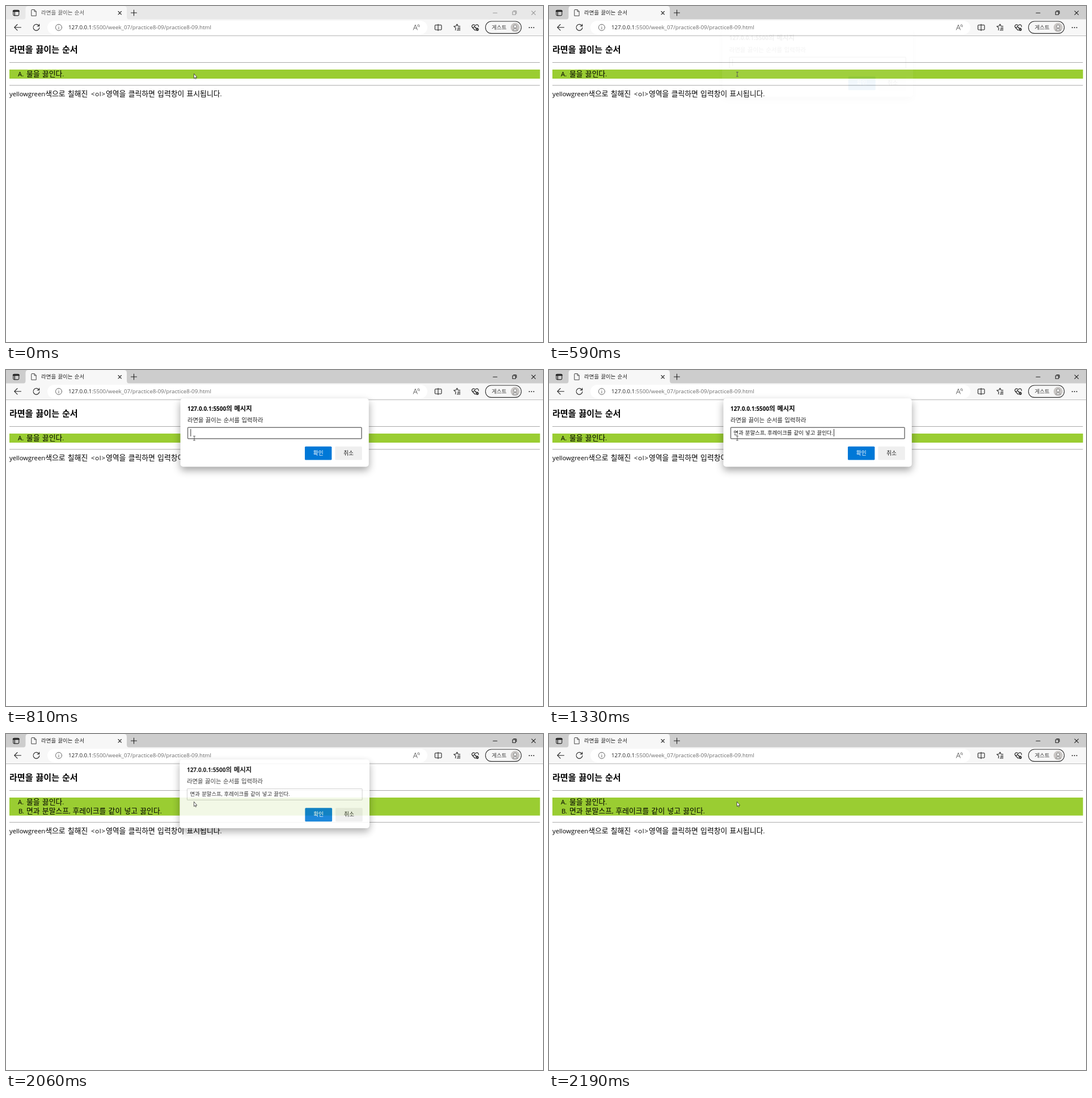
These frames come from a looping animation (947 by 592 pixels, 3400 ms). An HTML page:

```html
<!DOCTYPE html>
<html lang="ko">
<head>
<meta charset="utf-8">
<title>라면을 끓이는 순서</title>
<style>
html, body { margin: 0; width: 100%; height: 100%; overflow: hidden; background: #fff; }
svg { display: block; width: 947px; height: 592px; }
text { white-space: pre; word-spacing: .04em; font-family: "Open Sans", "Noto Sans", sans-serif; }
.ko { font-family: "Noto Sans CJK KR", "Noto Sans CJK", sans-serif; }
.icon { fill: none; stroke: #222; stroke-width: 1.1; stroke-linecap: round; stroke-linejoin: round; }
#box { filter: drop-shadow(0 6px 7px rgba(0, 0, 0, .36)); }
</style>
</head>
<body>
<svg viewBox="0 0 947 592">
  <rect width="947" height="592" fill="#fff"/>

  <!-- title bar -->
  <rect id="titlebar" width="947" height="24"/>
  <path d="M30 24Q34.5 24 34.5 19V5Q34.5 0 39.5 0H208Q213 0 213 5V19Q213 24 218 24Z" fill="#f7f7f7"/>
  <g class="icon">
    <rect x="12.8" y="7.3" width="10" height="9.6" rx="1.8"/>
    <path d="M13 9H22.6" stroke-width="2.6"/><path d="M15.4 9V16.5" stroke-width="1.2"/>
    <path d="M45.8 6.5H50.2L53.2 9.5V17.3H44.8V7.5Q44.8 6.5 45.8 6.5ZM50 6.8V9.8H53" stroke="#444" stroke-width="1"/>
    <path d="M198 9.5L203.4 14.9M203.4 9.5L198 14.9"/>
    <path d="M220.5 12H230.5M225.5 7V17"/>
  </g>
  <g id="controls" class="icon" stroke-width="1">
    <path d="M859 12.2H866M927 8.8L933.6 15.4M933.6 8.8L927 15.4"/>
    <path d="M893.3 10H898.6V15.2H893.3ZM895 8.5H899Q900.1 8.5 900.1 9.6V13.5"/>
  </g>

  <!-- toolbar -->
  <rect y="23.5" width="947" height="29" fill="#f7f7f7"/>
  <path d="M0 52.5H947" stroke="#bcbcbc"/>
  <rect x="73" y="26" width="670" height="24" rx="12" fill="#fff"/>
  <g class="icon">
    <path d="M26.5 37.7H14.8M20 32.5L14.8 37.7L20 42.9"/>
    <path d="M58.3 35.2A5.4 5.4 0 1 0 58.9 38M58.7 32V35.5H55.2"/>
    <g stroke="#666" stroke-width="1">
      <circle cx="93" cy="37.8" r="5.5"/><path d="M93 37.4V40.6M93 35.2V35.3"/>
      <path d="M718.3 42L721.8 33L725.3 42M719.6 39H724M725.6 33.4Q727 34.5 726.6 36.2M727.4 32.2Q729.8 34 729 36.8"/>
    </g>
    <path d="M761 33.5H757.7Q756.5 33.5 756.5 34.7V40.8Q756.5 42 757.7 42H761M763 33.5H766.8Q768 33.5 768 34.7V40.8Q768 42 766.8 42H763M762 32V43.5"/>
    <path d="M792.5 42.5L793.2 38.8L789.8 35.8L793.7 35.3L795.4 32L797 35.3L800.8 35.8M797 38H800.8M796.4 40.4H800.8M795.4 42.8H800.8"/>
    <path d="M827.5 43L822.5 38Q820.5 35.5 822.5 33.6Q825 31.7 827.5 34.5Q830 31.7 832.5 33.6Q833.8 35 833.2 36.6M822.5 37.7H825L826.3 35.4L828 39L829 37.5"/>
    <circle cx="831" cy="41.2" r="2.6" fill="#222" stroke="none"/>
    <path d="M829.8 41.2L830.7 42.1L832.3 40.4" stroke="#fff" stroke-width=".7"/>
    <rect x="845.5" y="27" width="63.2" height="21.4" rx="10.7" stroke="#333"/>
  </g>
  <circle cx="897.8" cy="37.8" r="8" fill="#c9c6c4"/>
  <g fill="#f4f4f4" stroke="#777" stroke-width=".9">
    <path d="M893.8 43.2Q893.8 40 897.8 40Q901.8 40 901.8 43.2Z"/><circle cx="897.8" cy="36" r="2.7"/>
  </g>
  <g fill="#222"><circle cx="922.8" cy="38" r="1"/><circle cx="926.7" cy="38" r="1"/><circle cx="930.6" cy="38" r="1"/></g>
  <g id="labels"></g>

  <!-- page -->
  <path d="M6 99.5H941.5" stroke="#a9a9a9"/>
  <rect id="list" x="6" y="112" width="935.7" fill="#9acd32"/>
  <g id="page"></g>
  <g id="second"></g>
  <g id="after"><path d="M6 139.8H941.5" stroke="#a9a9a9"/></g>

  <!-- prompt -->
  <g id="dialog">
    <rect id="box" x="307.5" y="50" width="332.3" height="120.5" rx="5" fill="#fff"/>
    <rect id="input" x="320.5" y="101.3" width="306.6" height="19.6" rx="1" fill="#fff"/>
    <rect x="527" y="134.8" width="47.4" height="23.8" rx="1.5" fill="#0078d7"/>
    <rect x="580.4" y="134.8" width="47.4" height="23.8" rx="1.5" fill="#efefef"/>
    <g id="entry"></g>
    <rect id="caret" y="104" width="1" height="13" fill="#333"/>
  </g>

  <path id="arrow" d="M331.4 119.2V127.6L333.2 126L334.4 128.6L335.6 128L334.5 125.5H336.8Z" fill="#fff" stroke="#333" stroke-width=".8"/>
  <path id="beam" d="M330 116.5H334M332 116.5V124M330 124H334" fill="none" stroke="#555" stroke-width=".9"/>
</svg>

<script>
const LOOP = 3400;
const $ = id => document.getElementById(id);

function add(parent, name, attrs) {
  const node = document.createElementNS("http://www.w3.org/2000/svg", name);
  for (const key in attrs) node.setAttribute(key, attrs[key]);
  return parent.appendChild(node);
}

// Korean and Latin runs each get their own face and optical size.
function write(parent, x, y, string, size, attrs = {}) {
  const line = add($(parent), "text", { x, y, ...attrs });
  for (const run of string.match(/[가-힣][가-힣 ]*|[^가-힣]+/g)) {
    const korean = /[가-힣]/.test(run);
    const span = add(line, "tspan", {
      class: korean ? "ko" : "latin",
      "font-size": size * (korean ? 1.07 : .94)
    });
    span.textContent = run;
  }
  return line;
}

const STEP = "면과 분말스프, 후레이크를 같이 넣고 끓인다.";
const bold = { "font-weight": 700 };
const middle = { "text-anchor": "middle" };

const tabTitle = write("labels", 62, 14.8, "라면을 끓이는 순서", 8.85);
write("labels", 110, 41.3, "127.0.0.1", 10.44, { fill: "#222" });
write("labels", 151.2, 41.3, ":5500/week_07/practice8-09/practice8-09.html", 10.44, { fill: "#6b6b6b" });
write("labels", 869.6, 40.9, "게스트", 8.9, { ...middle, fill: "#333" });

write("page", 6, 81.6, "라면을 끓이는 순서", 14.1, bold);
write("page", 21, 124.4, "A.", 12);
write("page", 36, 124.4, "물을 끓인다.", 12);
write("second", 22, 140.2, "B.", 12);
write("second", 36, 140.2, STEP, 12);
write("after", 6, 159.2, "yellowgreen색으로 칠해진", 12);
write("after", 150, 159.2, "<ol>", 12, { "letter-spacing": .8 });
write("after", 176, 159.2, "영역을 클릭하면 입력창이 표시됩니다.", 12);

write("dialog", 320, 72, "127.0.0.1:5500의 메시지", 10.6, bold);
write("dialog", 320, 92.3, "라면을 끓이는 순서를 입력하라", 9.6, { fill: "#222" });
write("dialog", 550.7, 149.7, "확인", 9.1, { ...middle, fill: "#fff" });
write("dialog", 604.1, 149.7, "취소", 9.1, { ...middle, fill: "#222" });
write("entry", 325.6, 114.2, STEP, 8.75, { fill: "#111" });

// Prompt poses: start time, opacity, vertical shift, scale.
const poses = [
  [0, 0, 0, 1],
  [590, .05, -11, 1.014],
  [660, .25, -9, 1.012],
  [730, .78, -3.5, 1.004],
  [810, 1, 0, 1],
  [2000, .98, -1, 1.001],
  [2060, .88, -4.8, 1.007],
  [2130, .25, -9, 1.012],
  [2190, 0, 0, 1]
];

const show = (id, on) => $(id).setAttribute("visibility", on ? "visible" : "hidden");
const set = (id, attrs) => { for (const key in attrs) $(id).setAttribute(key, attrs[key]); };

function render(t) {
  const active = t >= 70;
  set("titlebar", { fill: active ? "#cdcdcd" : "#e8e8e8" });
  $("controls").style.stroke = active ? "#222" : "#999";
  tabTitle.setAttribute("fill", active ? "#222" : "#555");

  const added = t >= 2060;
  set("list", { height: added ? 31.7 : 16 });
  set("after", { transform: `translate(0 ${added ? 15.8 : 0})` });
  show("second", added);

  const [, opacity, shift, scale] = poses.findLast(pose => t >= pose[0]);
  set("dialog", {
    opacity,
    transform: `translate(473.7 ${110 + shift}) scale(${scale}) translate(-473.7 -110)`
  });
  const focused = t < 2000;
  set("input", { stroke: focused ? "#737373" : "#ccc", "stroke-width": focused ? 1.5 : 1 });

  const filled = t >= 1330;
  show("entry", filled);
  show("caret", t < 1200 || (filled && t < 1860));
  set("caret", { x: filled ? 502 : 325.3 });

  const editing = t >= 590 && !added;
  show("beam", editing);
  show("arrow", !editing);
}

function tick() {
  render(performance.now() % LOOP);
  requestAnimationFrame(tick);
}
tick();
</script>
</body>
</html>
```
